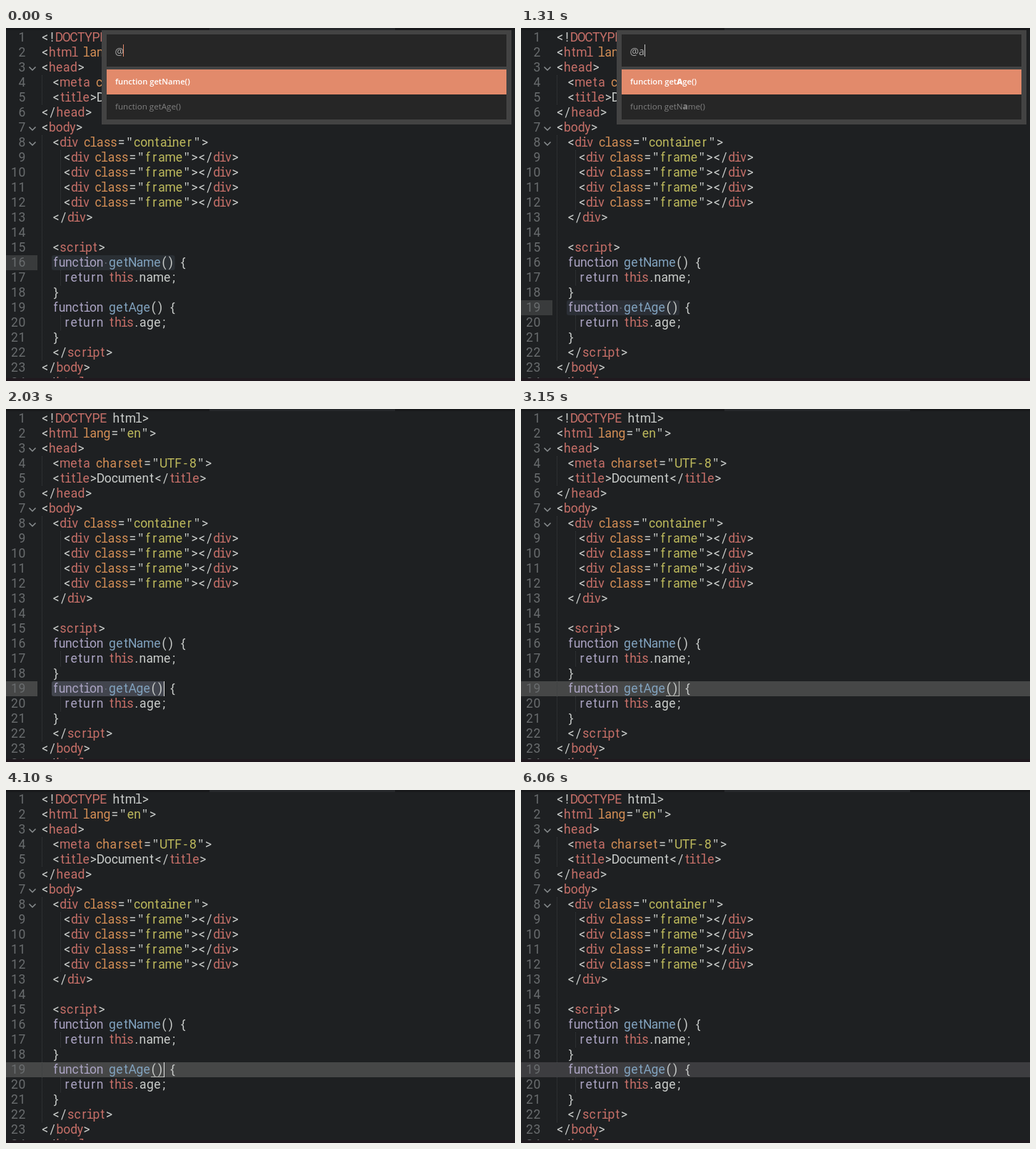
Recreate the animation shown at these times as an HTML page. Size 713 px wide and 494 px high, loop 6080 ms.

```html
<!DOCTYPE html>
<html lang="en">
<head>
<meta charset="UTF-8">
<title>Go to symbol</title>
<style>
  html, body { margin: 0; width: 100%; height: 100%; overflow: hidden; background: #1e2022; }
  svg { display: block; width: 713px; height: 494px; }
  .code { font: 400 17.5px Roboto, sans-serif; text-anchor: middle; }
  .slab { font-family: "Noto Sans Mono", monospace; }
  .ui { font-family: "Open Sans", sans-serif; font-size: 11.6px; white-space: pre; }
</style>
</head>
<body>
<svg id="stage" viewBox="0 0 713 494"></svg>
<script>
const LOOP = 6080, ROW = 21, LEFT = 49.5;
const FG = '#c9ccca', RED = '#c66f68', ORANGE = '#d38e55', YELLOW = '#bdb95c',
      LAVENDER = '#aaa3c2', BLUE = '#81a2be', GRAY = '#696c6e';

const LINES = `<!DOCTYPE html>
<html lang="en">
<head>
  <meta charset="UTF-8">
  <title>Document</title>
</head>
<body>
  <div class="container">
    <div class="frame"></div>
    <div class="frame"></div>
    <div class="frame"></div>
    <div class="frame"></div>
  </div>

  <script>
  function getName() {
    return this.name;
  }
  function getAge() {
    return this.age;
  }
  <\/script>
</body>
</html>`.split('\n');

const stage = document.getElementById('stage');

function add(tag, attrs, parent = stage) {
  const node = document.createElementNS('http://www.w3.org/2000/svg', tag);
  for (const key in attrs) node.setAttribute(key, attrs[key]);
  parent.appendChild(node);
  return node;
}
const rect = (x, y, width, height, fill, parent) =>
  add('rect', { x, y, width, height, fill }, parent);
const show = (node, on) => node.setAttribute('visibility', on ? 'inherit' : 'hidden');

// Advance of each glyph; the rest use the default width.
const ADVANCE = { ' ': 7.8, a: 10.3, m: 14.4, n: 9.3, u: 9.3, i: 7.2, t: 8.1, l: 8.5,
  f: 8.8, r: 9.5, c: 9.3, s: 9.4, v: 8.6, y: 7.8, '<': 10.3, '>': 10.3, '=': 11.5,
  '/': 10.6, '"': 11.6, '!': 9.5, '(': 9.3, ')': 9.3, '{': 10, '}': 10, '.': 8, ';': 9 };
const advance = c => ADVANCE[c] || (/[A-Z0-9-]/.test(c) ? 10.3 : 9.9);

const TOKEN = new RegExp([
  '((?<=")[\\w-]+(?="))',
  '((?<=<[/!]?)\\w+|this|(?<=\\))f)',
  '(\\w+(?==))',
  '(function|return)',
  '(get\\w+)',
  '(.)'
].join('|'), 'g');
const INKS = [YELLOW, RED, ORANGE, LAVENDER, BLUE, FG];

const baseline = n => 19 + ROW * (n - 1);
const rowTop = n => 3 + ROW * (n - 1);

function codeLine(n, source) {
  const text = add('text', { class: 'code', y: baseline(n) });
  let x = LEFT;
  for (const match of source.matchAll(TOKEN)) {
    const fill = INKS[match.slice(1).findIndex(Boolean)];
    for (const c of match[0]) {
      const w = advance(c);
      if (c !== ' ') {
        const glyph = add('tspan', { x: (x + w / 2).toFixed(1), fill }, text);
        if ('il"{}'.includes(c)) glyph.setAttribute('class', 'slab');
        glyph.textContent = c;
      }
      x += w;
    }
  }
  return text;
}

function lineNumber(n) {
  const digits = [...String(n)].reverse();
  const text = add('text', { class: 'code', y: baseline(n), fill: GRAY });
  digits.forEach((d, i) => {
    add('tspan', { x: 22.3 - i * 10.3 }, text).textContent = d;
  });
}

function guide(x, from, to) {
  add('line', { x1: x, x2: x, y1: rowTop(from), y2: rowTop(to + 1),
    stroke: '#3b3e40', 'stroke-dasharray': '1 1' });
}

// Editor
rect(0, 0, 713, 494, '#1e2022');
rect(0, 0, 713, 3, '#18191b');
rect(285, 0, 260, 3, '#26282b');

const gutter = rect(0, 0, 44, ROW, '#393b3c');
const band = rect(0, rowTop(19), 713, ROW, '#464747');

function selection(n, width) {
  const g = add('g', {});
  const box = add('rect', { x: 64, y: rowTop(n), width, height: ROW, rx: 3 }, g);
  add('circle', { cx: 139.8, cy: baseline(n) - 5, r: 1, fill: '#646a75' }, g);
  return { g, box };
}
const nameMark = selection(16, 172.5);
const ageMark = selection(19, 158);
nameMark.box.setAttribute('fill', '#2a2f34');

guide(50.5, 4, 5);
guide(50.5, 8, 22);
guide(76.5, 9, 12);
guide(76.5, 17, 17);
guide(76.5, 20, 20);

let plain;
LINES.forEach((source, i) => {
  lineNumber(i + 1);
  const text = codeLine(i + 1, source);
  if (i === 18) plain = text;
});
const typed = codeLine(19, LINES[18].replace(')', ')f'));

for (const n of [3, 7, 8]) {
  add('path', { d: `M32.5 ${baseline(n) - 6.5}l4.5 4.5l4.5 -4.5`, fill: 'none',
    stroke: '#8b9092', 'stroke-width': 1.5 });
}

const underline = rect(203, 401, 18, 1, '#b9b9b4');
const caret = rect(221, rowTop(19), 1, ROW, '#e4e4e2');
rect(0, 490, 713, 4, '#20191f');

// Symbol palette
const palette = add('g', {});
const frame = rect(134, 3, 574, 132, '#434343', palette);
rect(141, 9, 560, 45, '#262626', palette);
rect(141, 58, 560, 35, '#e28a6b', palette);
const second = add('g', {}, palette);
rect(141, 93, 560, 35, '#262626', second);

function label(x, y, fill, parent, weight = 400) {
  return add('text', { class: 'ui', x, y, fill, 'font-weight': weight }, parent);
}
const query = label(152.5, 37.5, '#a9a9a9', palette);
query.style.fontSize = '14px';
const first = label(153, 79, '#fff', palette, 600);
first.style.fontSize = '11.2px';
const other = label(153, 114, '#808080', second);
const queryCaret = rect(164, 23, 1, 17, '#e28a6b', palette);

// Text between asterisks is set bold.
function setLabel(node, text) {
  if (node.dataset.text === text) return;
  node.dataset.text = text;
  node.textContent = '';
  text.split('*').forEach((part, i) => {
    const span = add('tspan', i % 2 ? { 'font-weight': 800 } : {}, node);
    span.textContent = part;
  });
}

// Stepped fade from 0 to 1, already moving at its start.
function fade(t, from, to, steps) {
  if (t < from) return 0;
  if (t >= to) return 1;
  return (Math.floor((t - from) / (to - from) * (steps - 1)) + 1) / steps;
}

function mix(a, b, k) {
  return `rgb(${a.map((v, i) => Math.round(v + (b[i] - v) * k))})`;
}

function drawPalette(t) {
  const q = t < 1310 ? '@' : t < 1490 ? '@a' : t < 1610 ? '@ag' : '@age';
  const match = q.slice(1);
  const two = t < 1490;
  setLabel(query, q);
  if (!match) {
    setLabel(first, 'function getName()');
    setLabel(other, 'function getAge()');
  } else {
    const hit = 'A' + match.slice(1);
    setLabel(first, 'function get' + 'Age()'.replace(hit, `*${hit}*`));
    setLabel(other, 'function getN*a*me()');
  }
  show(second, two);
  frame.setAttribute('height', two ? 132 : 97);
  queryCaret.setAttribute('x', [164, 173, 181, 189][match.length]);
  queryCaret.setAttribute('fill', match ? '#c4c4c4' : '#e28a6b');
  queryCaret.setAttribute('opacity',
    match ? 1 : 1 - fade(t, 240, 470, 4) + fade(t, 830, 1010, 3));
}

function drawEditor(t) {
  const open = t < 2030, onName = t < 1310, editing = t >= 2980;
  const extra = t >= 3570 && t < 3980;

  gutter.setAttribute('y', rowTop(onName ? 16 : 19));
  gutter.setAttribute('fill', open ? '#393b3c' : '#464747');
  show(gutter, !editing);
  show(band, editing);
  band.setAttribute('fill', mix([70, 71, 71], [61, 61, 64], fade(t, 5390, 5750, 6)));

  show(nameMark.g, onName);
  show(ageMark.g, !onName && !editing);
  ageMark.box.setAttribute('fill', open ? '#2b2f36' : '#42454e');

  show(plain, !extra);
  show(typed, extra);
  show(underline, editing && t < 6060 && !(t >= 3680 && t < 3980));

  const blink = 1 - fade(t, 2440, 2620, 3) + fade(t, 2980, 3210, 4)
    - fade(t, 4620, 4800, 3) + fade(t, 5210, 5390, 3);
  caret.setAttribute('x', extra ? 229 : 221);
  caret.setAttribute('opacity', open || t >= 6060 ? 0 : blink);
}

function draw(t) {
  show(palette, t < 2030);
  drawPalette(t);
  drawEditor(t);
}

const start = performance.now();
function tick() {
  draw((performance.now() - start) % LOOP);
  requestAnimationFrame(tick);
}
tick();
</script>
</body>
</html>
```
